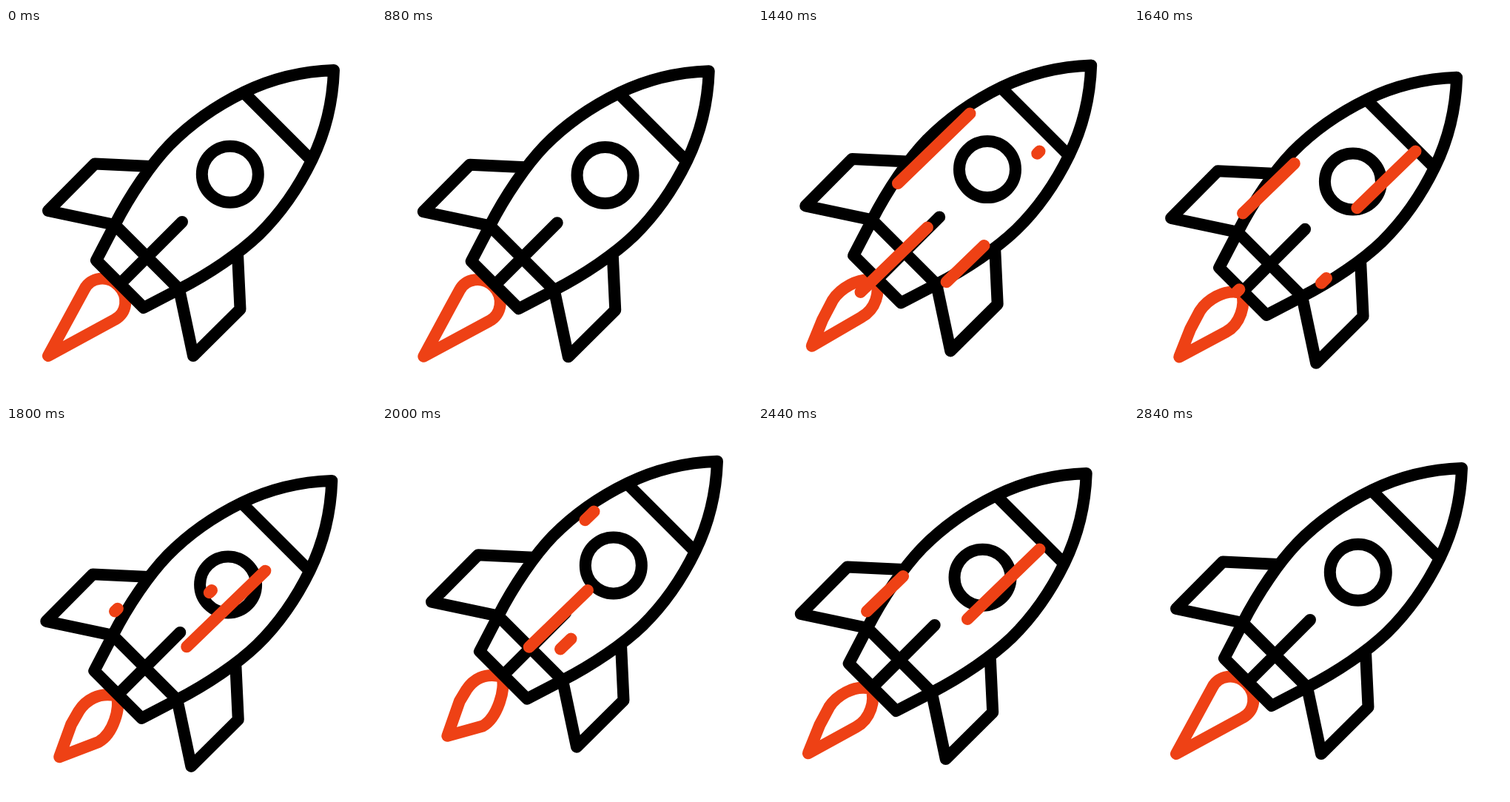
These frames come from a looping animation (500 px wide and 500 px high, 3 s). An HTML page with a canvas:

```html
<!DOCTYPE html>
<html lang="en">
<head>
<meta charset="utf-8">
<title>Rocket</title>
<style>
  html, body { margin: 0; width: 100%; height: 100%; overflow: hidden; background: #fff; }
  canvas { display: block; width: 500px; height: 500px; }
</style>
</head>
<body>
<canvas id="stage" width="500" height="500"></canvas>
<script>
const ctx = document.getElementById('stage').getContext('2d');
const ORANGE = '#ee4115';
const TICK = 40, TICKS = 75, LAUNCH = 21;

const clamp = v => Math.min(1, Math.max(0, v));
const ease = v => { const t = clamp(v); return t * t * (3 - 2 * t); };
const ramp = (tick, from, to) => ease((tick - from) / (to - from));
const lerp = (a, b, k) => a + (b - a) * k;
const mix = (a, b, k) => a.map((v, i) => lerp(v, b[i], k));
const add = (a, b) => a.map((v, i) => v + b[i]);

function polyline(...points) {
  const path = new Path2D();
  points.forEach(p => path.lineTo(...p));
  return path;
}

// The rocket is thrown between a few stops, easing on every leg.
const REST = [0, 0], BACK = [-8, 8], FORWARD = [10, -9.3];
const LOW = [1.8, 17.4], LOW_LEFT = [-2.4, 17.4];
const STOPS = [REST, BACK, LOW, FORWARD, BACK, LOW_LEFT, FORWARD, LOW, REST];
const LEGS = [4, 6, 4, 4, 7, 4, 8.4, 4.6];

function shake(tick) {
  let start = LAUNCH, place = REST;
  LEGS.forEach((length, i) => {
    if (tick > start) place = mix(STOPS[i], STOPS[i + 1], ramp(tick, start, start + length));
    start += length;
  });
  return place;
}

function buildRocket() {
  const half = new Path2D();
  half.moveTo(443, 57);
  half.bezierCurveTo(400, 58.5, 360, 68, 322, 86.5);
  half.bezierCurveTo(284, 105, 248, 130.5, 221, 158);
  half.bezierCurveTo(196, 184, 168, 225, 147, 266);
  half.lineTo(122, 314);
  half.lineTo(154.5, 346.5);
  half.addPath(polyline([195, 187], [120, 183.5], [57, 247], [147, 266]));

  // Mirror in the long axis, the line x + y = 500.
  const rocket = new Path2D(half);
  rocket.addPath(half, new DOMMatrix([0, -1, -1, 0, 500, 500]));
  rocket.addPath(polyline([322, 88], [412, 178]));
  rocket.addPath(polyline([147, 266], [234, 353]));
  rocket.addPath(polyline([238, 262], [154.5, 345.5]));
  rocket.moveTo(340.8, 197.7);
  rocket.arc(302.8, 197.7, 38, 0, Math.PI * 2);
  return rocket;
}
const ROCKET = buildRocket();

// Flame poses: tip, left bend, left shoulder, right shoulder
const FULL = [[57, 443], [94, 375], [106, 353], [147, 394]];
const SHORT = [[78.5, 428], [95, 381], [104, 366], [126, 415]];
const THIN = [[64.5, 437], [79, 402], [93, 375], [133, 396]];
const APEX = [152, 348];

function drawFlame(tick) {
  const pinch = ramp(tick, LAUNCH, 31) - ramp(tick, 60, 71);
  const stretch = ramp(tick, 31, 37) - ramp(tick, 37, 49) + ramp(tick, 49, 66);
  const [tip, bend, left, right] = FULL.map((point, i) =>
    mix(point, mix(SHORT[i], THIN[i], stretch), pinch));
  const handle = (point, full, thin) => add(point, mix(full, thin, pinch));

  ctx.beginPath();
  [tip, bend, left].forEach(p => ctx.lineTo(...p));
  ctx.bezierCurveTo(
    ...handle(left, [8, -16], [9, -14]),
    ...handle(APEX, [-15, -15], [-24, -6]),
    ...APEX);
  ctx.bezierCurveTo(
    ...handle(APEX, [15, 15], [6, 15]),
    ...handle(right, [16, -8], [20, -11]),
    ...right);
  ctx.closePath();
  ctx.strokeStyle = ORANGE;
  ctx.stroke();
}

// Streaks fly down to the left; some come back after one period.
const PERIOD = 19, FALL = [-139.5, 135];
const STREAKS = [
  { from: [286.5, 115.5], start: 29, runs: 2, size: 1 },
  { from: [278, 222], start: 25, runs: 2, size: 1 },
  { from: [320, 280], start: 26, runs: 1, size: 0.48 },
  { from: [380.5, 166.5], start: 35, runs: 2, size: 1 }
];

function drawStreak({ from, start, runs, size }, tick) {
  const at = k => add(from, FALL.map(v => v * size * k));
  for (let run = 0; run < runs; run++) {
    const age = tick - start - run * PERIOD;
    const head = ramp(age, 0, 11), tail = ramp(age, 7, 17);
    if (head > tail) ctx.stroke(polyline(at(tail), at(head)));
  }
}

function draw(tick) {
  ctx.fillStyle = '#fff';
  ctx.fillRect(0, 0, 500, 500);
  ctx.lineWidth = 16;
  ctx.lineCap = ctx.lineJoin = 'round';

  ctx.save();
  ctx.translate(...shake(tick));
  drawFlame(tick);
  ctx.strokeStyle = '#000';
  ctx.stroke(ROCKET);
  ctx.restore();

  ctx.strokeStyle = ORANGE;
  STREAKS.forEach(streak => drawStreak(streak, tick));
}

const begin = performance.now();
function loop() {
  draw(Math.floor((performance.now() - begin) / TICK) % TICKS);
  requestAnimationFrame(loop);
}
loop();
</script>
</body>
</html>
```
